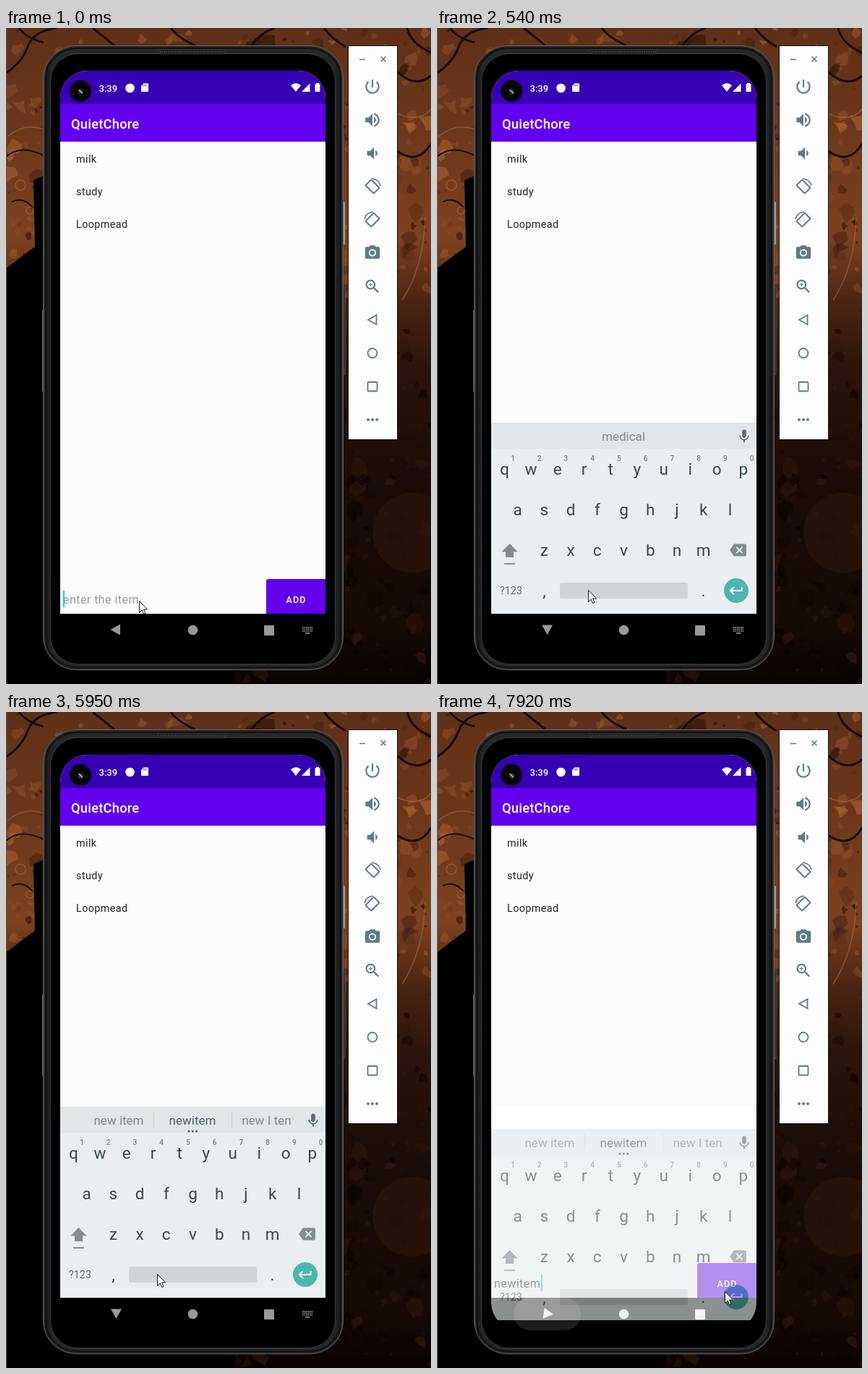
These frames come from a looping animation (588x906 px, 8 s). An HTML page:

```html
<!DOCTYPE html>
<html lang="en">
<head>
<meta charset="utf-8">
<title>To-do list demo</title>
<style>
html, body { margin: 0; width: 100%; height: 100%; overflow: hidden; background: #000; }
svg { display: block; width: 588px; height: 906px; font-family: Roboto, sans-serif; }
</style>
</head>
<body>
<svg id="stage" viewBox="0 0 588 906" xmlns="http://www.w3.org/2000/svg">
  <defs>
    <clipPath id="screen"><rect x="75" y="59" width="367" height="795" rx="38"/></clipPath>
    <linearGradient id="wall" x1="0" y1="0" x2="0" y2="1">
      <stop offset="0" stop-color="#5f3018"/>
      <stop offset=".15" stop-color="#6b371b"/>
      <stop offset=".32" stop-color="#7d411f"/>
      <stop offset=".42" stop-color="#4a2412"/>
      <stop offset=".52" stop-color="#2b140b"/>
      <stop offset=".68" stop-color="#1a0c07"/>
      <stop offset=".92" stop-color="#160a05"/>
      <stop offset="1" stop-color="#070302"/>
    </linearGradient>
    <linearGradient id="rim" x1="0" x2="1" y1="0" y2="0">
      <stop offset="0" stop-color="#3c3e40"/>
      <stop offset=".012" stop-color="#1a1b1c"/>
      <stop offset=".03" stop-color="#262728"/>
      <stop offset=".97" stop-color="#262728"/>
      <stop offset=".988" stop-color="#1a1b1c"/>
      <stop offset="1" stop-color="#3c3e40"/>
    </linearGradient>
  </defs>

  <rect width="588" height="906" fill="url(#wall)"/>
  <g id="blots"></g>
  <g fill="none" stroke="#1a0a05" stroke-width="3">
    <path d="M0 62Q22 48 30 26T70 0M18 0Q28 14 52 20M120 0L150 24M228 0Q238 14 262 24M340 24Q352 6 372 0M440 0Q452 16 470 26"/>
    <path d="M541 60Q566 84 588 66M541 170Q570 190 588 160M555 0Q560 22 588 34"/>
    <path d="M0 178Q20 160 52 176M8 240Q26 232 38 250" stroke-width="2"/>
  </g>
  <g fill="none" stroke="#a86a3c" stroke-width="1.500" opacity=".6">
    <path d="M541 118Q572 132 588 112M548 376Q578 330 580 262M2 150Q26 130 52 140"/>
    <circle cx="20" cy="217" r="7"/><circle cx="33" cy="252" r="5"/>
  </g>
  <circle cx="562" cy="697" r="55" fill="#2e180c" opacity=".6"/>
  <path d="M0 332L40 302 38 210 52 204 330 500 316 906H0Z" fill="#000"/>
  <rect width="1" height="906" fill="#555"/>

  <g id="phone">
    <rect x="465" y="240" width="4" height="59" rx="1" fill="#8fa39b"/>
    <rect x="465" y="358" width="4" height="121" rx="1" fill="#2b2c2c" stroke="#5c5c5c" stroke-width=".7"/>
    <rect x="50" y="390" width="2" height="112" fill="#5a5a5a"/>
    <rect x="51.500" y="24.500" width="415" height="862" rx="46" fill="url(#rim)" stroke="#626466"/>
    <rect x="55" y="28" width="408" height="855" rx="43" fill="none" stroke="#101010" stroke-width="2"/>
    <rect x="61.500" y="35.500" width="394" height="843" rx="38" fill="#000" stroke="#3b3c3d"/>
    <path d="M210 30H306L302 36H214Z" fill="#161616" stroke="#4b4b4b" stroke-width=".7"/>
    <path d="M214 33H303" stroke="#555" stroke-width="3" stroke-dasharray="1 1.5"/>
  </g>

  <g clip-path="url(#screen)">
    <rect x="75" y="59" width="367" height="750" fill="#fcfcfc"/>
    <rect x="75" y="59" width="367" height="46" fill="#3700b3"/>
    <rect x="75" y="105" width="367" height="52" fill="#6200ee"/>
    <g fill="#fff">
      <text x="128.500" y="87.500" font-size="13" font-weight="500">3:39</text>
      <circle cx="171.500" cy="83" r="6.300"/>
      <path d="M190.500 76.500H196q1 0 1 1V87q0 1-1 1H188q-1 0-1-1V80Z"/>
      <path d="M394 79.300Q401 73 408 79.300L401 88ZM409 88L420.500 76.500V88Z"/>
      <path d="M429 76H433V77.500H434.500V88H427.500V77.500H429Z"/>
      <text x="90" y="139" font-size="18.300" font-weight="500" letter-spacing=".25">QuietChore</text>
    </g>
    <path d="M190 78v2.500M192 78v2.500M194 78v2.500" stroke="#3700b3" stroke-width=".8"/>
    <g font-size="14.300" letter-spacing=".45" fill="#212121">
      <text x="97" y="186">milk</text>
      <text x="97" y="231">study</text>
      <text x="97" y="275.500">Loopmead</text>
    </g>
    <text id="field" x="79" y="795" font-size="16" letter-spacing=".45"></text>
    <rect id="caret" y="777" width="2" height="23" fill="#03dac5"/>
    <path d="M442 761H363q-3 0-3 3V809H442Z" fill="#6200ee"/>
    <text x="387.500" y="794" font-size="12.500" font-weight="500" letter-spacing="1.100" fill="#fff">ADD</text>
    <rect id="gap" x="75" y="545" width="367" height="31" fill="#fff"/>
    <g id="keyboard">
      <rect x="75" y="545" width="367" height="264" fill="#eaeef1"/>
      <rect x="75" y="545" width="367" height="36" fill="#e1e6e9"/>
      <g font-size="17" text-anchor="middle">
        <text id="left" x="156" y="570" fill="#7d878c"></text>
        <text id="mid" x="258" y="570"></text>
        <text id="right" x="360.500" y="570" fill="#7d878c"></text>
      </g>
      <g id="split">
        <path d="M204.500 552V575M312.500 552V575" stroke="#c8ced1"/>
        <path d="M253 579h.01M258.300 579h.01M263.600 579h.01" stroke="#4f5b62" stroke-width="3" stroke-linecap="round"/>
      </g>
      <g id="keys" text-anchor="middle" fill="#37474f"></g>
      <path d="M100.500 712L111.500 723.500H106V731H95V723.500H89.500Z" fill="#818c91"/>
      <path d="M93 740H108" stroke="#818c91" stroke-width="1.800"/>
      <rect x="170" y="766" width="177" height="22" rx="3" fill="#cfd4d7"/>
      <circle cx="414" cy="777" r="17" fill="#4db6ac"/>
      <g id="keyIcons"></g>
    </g>
    <rect id="ripple" y="809" height="45" rx="22" fill="#fff"/>
  </g>

  <g id="nav">
    <path id="back" d="M-7 0L6.500-7.500V7.500Z"/>
    <circle cx="258.500" cy="831.500" r="6.800"/>
    <rect x="357" y="825" width="14" height="14" rx="1"/>
    <g id="ime"></g>
  </g>

  <circle cx="103" cy="87" r="15" fill="#050505"/>
  <circle cx="103.500" cy="88" r="4" fill="#2c2624"/>
  <path d="M101.500 86L105 89.500" stroke="#b6a493" stroke-width="2" stroke-linecap="round"/>

  <rect x="473.500" y="24.500" width="68" height="544" fill="#fdfdfd" stroke="#111"/>
  <g id="tools" fill="#5d7b88"></g>

  <path id="pointer" d="M.5.500V16.500L4.200 13 6.700 18.500 9 17.500 6.500 12H11.500Z" fill="#fff" stroke="#000" stroke-width=".9"/>
</svg>
<script>
const $ = id => document.getElementById(id);
const fill = (id, html) => { $(id).innerHTML = html; };
const set = (id, attrs) => {
  for (const k in attrs) $(id).setAttribute(k, attrs[k]);
};
const show = (id, on) => set(id, { visibility: on ? 'visible' : 'hidden' });

// Mottled wallpaper
let seed = 11;
const rnd = () => (seed = seed * 16807 % 2147483647) / 2147483647;
const warm = ['#a55b2c', '#ad6433', '#4a2210', '#2b1309', '#8a4a26', '#190a05'];
const dim = ['#2f180c', '#0b0503', '#371c0e', '#140a05', '#060302'];
let blots = '';
for (let i = 0; i < 1100; i++) {
  const x = rnd() * 588, y = rnd() * 906, r = 2 + rnd() * rnd() * 16;
  const tones = y < 370 ? warm : dim;
  let d = '';
  for (let k = 0; k < 7; k++) {
    const a = k * Math.PI * 2 / 7, q = r * (.4 + rnd() * .9);
    d += (k ? 'L' : 'M') + (x + q * Math.cos(a)).toFixed(1) + ' ' + (y + q * Math.sin(a)).toFixed(1);
  }
  blots += `<path d="${d}Z" fill="${tones[Math.floor(rnd() * tones.length)]}" opacity="${(.25 + rnd() * .4).toFixed(2)}"/>`;
}
fill('blots', blots);

// Icon path on a 24-unit grid, centred at x, y
const icon = (x, y, s, d, extra = '') =>
  `<g transform="translate(${x} ${y}) scale(${s}) translate(-12 -12)"><path d="${d}"/>${extra}</g>`;

const row = (chars, x, y, size, extra = '') => [...chars].map((c, i) =>
  `<text x="${(x + i * 36.72).toFixed(1)}" y="${y}" font-size="${size}" ${extra}>${c}</text>`).join('');

fill('keys',
  row('qwertyuiop', 93.300, 617, 22.500) +
  row('asdfghjkl', 111.700, 673, 22.500) +
  row('zxcvbnm', 148.300, 729, 22.500) +
  row('1234567890', 105, 597.500, 10, 'font-weight="500" fill="#76838a"') +
  '<text x="102.500" y="782" font-size="14.300" fill="#5a686f">?123</text>' +
  '<text x="148.500" y="785" font-size="22.500">,</text><text x="368.500" y="785" font-size="22.500">.</text>');

fill('keyIcons',
  '<g fill="#5f6d74">' + icon(425, 564, .95, 'M12 14c1.660 0 2.990-1.340 2.990-3L15 5c0-1.660-1.340-3-3-3S9 3.340 9 5v6c0 1.660 1.340 3 3 3zm5.300-3c0 3-2.540 5.100-5.300 5.100S6.700 14 6.700 11H5c0 3.410 2.720 6.230 6 6.720V21h2v-3.280c3.280-.48 6-3.300 6-6.720h-1.700z') + '</g>' +
  '<g fill="#818c91">' + icon(416.500, 721, .95, 'M22 3H7c-.69 0-1.230.35-1.590.88L0 12l5.410 8.110c.36.53.9.89 1.590.89h15c1.100 0 2-.9 2-2V5c0-1.100-.9-2-2-2zm-3 12.590L17.590 17 14 13.410 10.410 17 9 15.590 12.590 12 9 8.410 10.410 7 14 10.590 17.590 7 19 8.410 15.410 12 19 15.590z') + '</g>' +
  '<g fill="#fff">' + icon(414, 777, .95, 'M19 7v4H5.830l3.580-3.590L8 6l-6 6 6 6 1.410-1.410L5.830 13H21V7z') + '</g>');

let ime = '';
for (let r = 0; r < 3; r++)
  for (let c = 0; c < 6; c++)
    ime += `<rect x="${410 + c * 2.5}" y="${827 + r * 2.5}" width="1.600" height="1.600"/>`;
fill('ime', ime + '<rect x="414" y="835" width="6.500" height="1.600"/>');

const speaker = 'l5 5V4L';
const turn = (y, flip) => `<g transform="translate(507 ${y}) scale(${flip} 1)" fill="none" stroke="#5d7b88">
  <rect x="-5.500" y="-8" width="11" height="16" rx="1" transform="rotate(-45)" stroke-width="2"/>
  <path d="M-1-11Q9-10 11-1" stroke-width="1.600"/></g>`;
fill('tools',
  '<path d="M489 43.500H497M518.500 39.500L525.500 46.500M525.500 39.500L518.500 46.500" stroke="#5d7b88" stroke-width="1.600"/>' +
  icon(507, 81, 1.08, 'M13 3h-2v10h2V3zm4.830 2.170l-1.420 1.420C17.990 7.860 19 9.810 19 12c0 3.870-3.130 7-7 7s-7-3.130-7-7c0-2.190 1.010-4.140 2.580-5.420L6.170 5.170C4.230 6.820 3 9.260 3 12c0 4.970 4.030 9 9 9s9-4.030 9-9c0-2.740-1.230-5.180-3.170-6.830z') +
  icon(507, 127, 1.08, `M3 9v6h4${speaker}7 9H3zm13.500 3c0-1.770-1.020-3.290-2.500-4.030v8.050c1.480-.73 2.500-2.250 2.500-4.020zM14 3.230v2.060c2.890.86 5 3.540 5 6.710s-2.110 5.850-5 6.710v2.060c4.010-.91 7-4.490 7-8.770s-2.990-7.860-7-8.770z`) +
  icon(507, 173, 1.05, `M18.500 12c0-1.770-1.020-3.290-2.500-4.030v8.050c1.480-.73 2.500-2.250 2.500-4.020zM5 9v6h4${speaker}9 9H5z`) +
  turn(219, 1) + turn(265, -1) +
  icon(507, 310.5, 1.02, 'M9 2L7.170 4H4c-1.100 0-2 .9-2 2v12c0 1.100.9 2 2 2h16c1.100 0 2-.9 2-2V6c0-1.100-.9-2-2-2h-3.170L15 2H9zm3 15c-2.760 0-5-2.240-5-5s2.240-5 5-5 5 2.240 5 5-2.240 5-5 5z', '<circle cx="12" cy="12" r="3.200"/>') +
  icon(507, 357, 1.05, 'M15.500 14h-.79l-.28-.27C15.410 12.590 16 11.110 16 9.500 16 5.910 13.090 3 9.500 3S3 5.910 3 9.500 5.910 16 9.500 16c1.610 0 3.090-.59 4.230-1.570l.27.28v.79l5 4.990L20.490 19l-4.990-5zm-6 0C7.010 14 5 11.990 5 9.500S7.010 5 9.500 5 14 7.010 14 9.500 11.990 14 9.500 14zm2.500-4h-2v2H9v-2H7V9h2V7h1v2h2v1z') +
  `<g fill="none" stroke="#5d7b88" stroke-width="1.800">
    <path d="M501 403L512.500 396.500V409.500Z"/><circle cx="507" cy="449" r="6.500"/>
    <rect x="500.500" y="489" width="13" height="12.500" rx="1"/></g>
  <circle cx="501" cy="541" r="2"/><circle cx="507" cy="541" r="2"/><circle cx="513" cy="541" r="2"/>`);

// Last entry whose start time has passed
const at = (list, t) => list.filter(e => e[0] <= t).pop();

const pointer = [
  [0, 184, 791], [130, 197, 782], [250, 209, 773], [390, 209, 776],
  [6790, 224, 769], [6940, 210, 787], [7060, 182, 812], [7180, 164, 824],
  [7340, 164, 823], [7630, 183, 833], [7780, 354, 819], [7920, 398, 800]
];
const words = [
  [0, '', 'medical', ''], [3270, 'be', 'ne', 'me'], [3550, 'news', 'new', 'newer'],
  [5220, 'new l', 'newi', 'new'], [5510, 'new it', 'newit', 'newt'],
  [5660, 'new ite', 'newite', 'new tie'], [5950, 'new item', 'newitem', 'new I ten']
];
const arrow = [[0, 0, 151.5], [390, 98, 153], [540, 270, 152.5], [7630, 187, 154]];
const tint = [[0, '#999'], [7480, '#bababa'], [7630, '#f2f2f2']];

function draw(t) {
  const [, px, py] = at(pointer, t);
  set('pointer', { transform: `translate(${px} ${py})` });

  const open = t >= 390, leaving = t >= 7630, pressed = t >= 7480;
  const [, a, b, c] = at(words, t);
  $('left').textContent = a;
  $('mid').textContent = b;
  $('right').textContent = c;
  set('mid', { fill: a ? '#525e64' : '#7d878c' });
  show('split', open && a !== '');

  show('keyboard', open);
  set('keyboard', { transform: `translate(0 ${leaving ? 31 : 0})`, opacity: leaving ? .6 : 1 });
  show('gap', leaving);

  $('field').textContent = open ? 'newitem' : 'enter the item';
  set('field', { fill: open ? '#212121' : '#999' });
  set('caret', { x: open ? 144 : 79 });

  const [, angle, x] = at(arrow, t);
  set('back', { transform: `translate(${x} 831) rotate(${angle})` });
  set('nav', { fill: at(tint, t)[1] });
  show('ime', !leaving);
  show('ripple', pressed);
  set('ripple', { x: leaving ? 106 : 108, width: leaving ? 93 : 89, opacity: leaving ? .11 : .14 });
}

const start = performance.now();
function tick() {
  draw((performance.now() - start) % 8000);
  requestAnimationFrame(tick);
}
tick();
</script>
</body>
</html>
```
